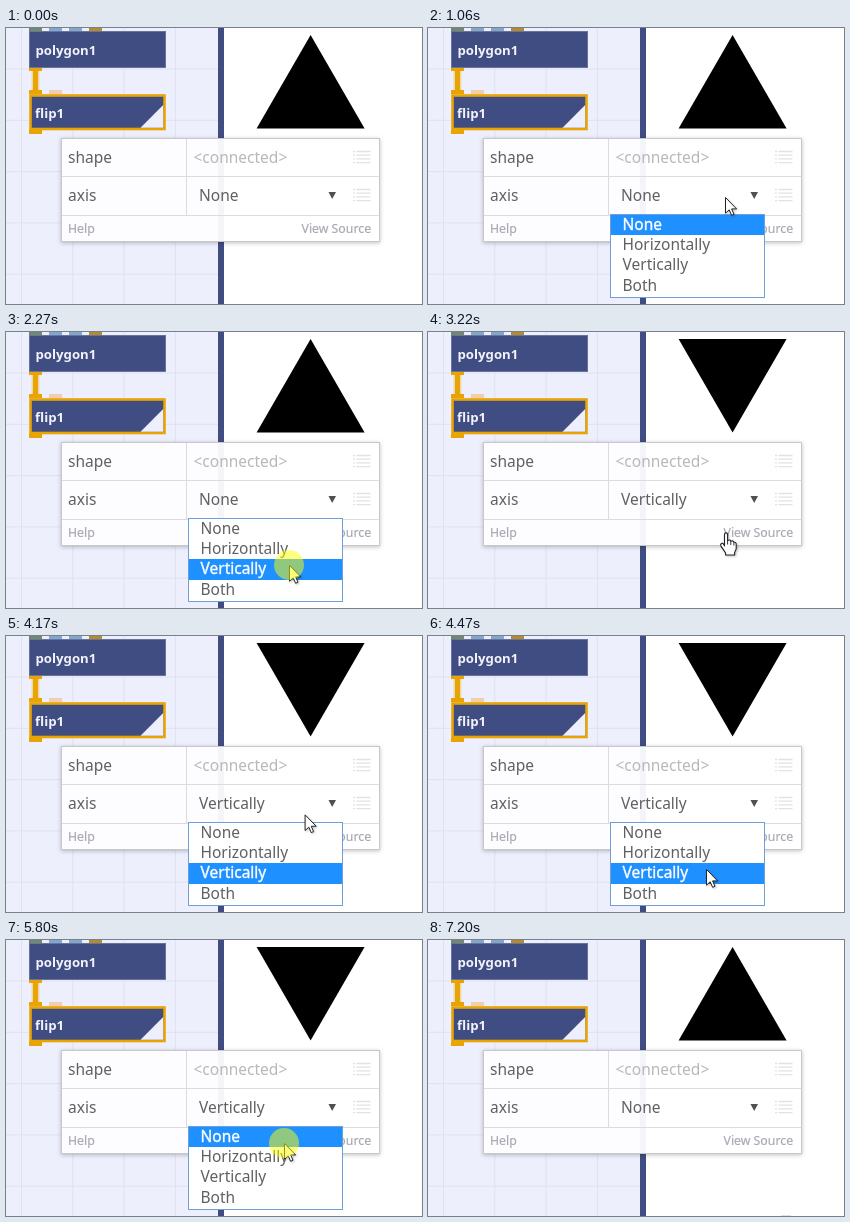
An HTML page for the animation above (7280 ms loop, 416x276 px).

```html
<!DOCTYPE html>
<html lang="en">
<head>
<meta charset="utf-8">
<title>Flip node</title>
<style>
html, body { margin: 0; width: 100%; height: 100%; overflow: hidden; background: #fff; }
svg { display: block; width: 416px; height: 276px; }
text { font-family: "Noto Sans", "Open Sans", sans-serif; font-size: 15.5px; fill: #606060; }
.node { font-size: 13.2px; font-weight: 600; fill: #f2f3fa; }
.foot { font-size: 12.3px; fill: #a9a9b4; stroke: #a9a9b4; stroke-width: .2px; }
.picked { fill: #fff; stroke: #fff; stroke-width: .35px; }
.panel { filter: drop-shadow(0 1px 2px rgba(0, 0, 0, .25)); }
.cursor { filter: drop-shadow(1px 1px 1px rgba(0, 0, 0, .25)); }
</style>
</head>
<body>
<svg viewBox="0 0 416 276">
  <defs>
    <pattern id="grid" x="15" y="40.5" width="51.3" height="51.3" patternUnits="userSpaceOnUse">
      <path d="M.5 0V52M0 .5H52" stroke="#dfe1ee"/>
    </pattern>
  </defs>
  <rect width="416" height="276" fill="#fff"/>
  <rect width="212" height="276" fill="#eeeffc"/>
  <rect width="212" height="276" fill="url(#grid)"/>
  <rect x="212" width="6" height="276" fill="#404d82"/>

  <path d="M23 0h13v3h-13z" fill="#71896d"/>
  <path d="M43 0h13v3h-13zM63 0h13v3h-13z" fill="#82a6cc"/>
  <path d="M83 0h13v3h-13z" fill="#b48a32"/>
  <rect x="23.5" y="3.5" width="136" height="36" fill="#404d82" stroke="#69739b"/>
  <text class="node" x="29.5" y="27">polygon1</text>

  <path d="M29.5 43V62" stroke="#e8a400" stroke-opacity=".3" stroke-width="8"/>
  <path d="M29.5 42V63" stroke="#e8a400" stroke-width="5"/>
  <path d="M23 40h13v3h-13zM23 62h13v4h-13zM23 102h13v4h-13z" fill="#e8a400"/>
  <rect x="43" y="62" width="13" height="4" fill="#f1cfac"/>
  <rect x="24.5" y="67.5" width="134" height="33.5" fill="#404d82" stroke="#e8a400" stroke-width="2.6"/>
  <path d="M134.5 99.7L157.2 77V99.7Z" fill="#eeeffc"/>
  <text class="node" x="29" y="90">flip1</text>

  <path id="shape"/>

  <rect class="panel" x="55.5" y="110.5" width="318" height="103" fill="#fff" stroke="#c8c8cc"/>
  <rect x="56" y="111" width="156" height="102" fill="#fdfdff"/>
  <rect x="212" y="111" width="6" height="102" fill="#f4f5f9"/>
  <path d="M56 148.5H373M56 187.5H373M180.5 111V187" stroke="#dcdcde"/>
  <text x="62" y="135">shape</text>
  <text x="62" y="173">axis</text>
  <text x="187.5" y="135" style="fill:#b8b8b8">&lt;connected&gt;</text>
  <text id="value" x="193" y="173"></text>
  <path d="M322.5 164H330L326.2 171Z" fill="#505050"/>
  <g stroke="#e2e2e2" stroke-width="1.3">
    <path id="list" d="M347 123.5h2m1.5 0h14M347 127.2h2m1.5 0h14M347 130.9h2m1.5 0h14M347 134.6h2m1.5 0h14"/>
    <use href="#list" y="38"/>
  </g>
  <text class="foot" x="62" y="205">Help</text>
  <text class="foot" x="295.5" y="205">View Source</text>

  <g id="menu">
    <rect x="182.5" y="186.5" width="154" height="83" fill="#fff" stroke="#6f9fd8"/>
    <rect id="hover" x="183" width="153" fill="#1e90ff"/>
  </g>

  <g id="arrow" class="cursor">
    <path d="M.5.5V16.2L4.2 12.8L6.6 18.3L9 17.2L6.6 11.9H11.6Z" fill="#fff" stroke="#222"/>
  </g>
  <g id="hand" class="cursor">
    <path d="M-1.5 12V1.2Q-1.5-.6 0-.6T1.6 1.2V7Q4.2 5.6 4.8 7.8Q7.2 6.7 7.9 8.8Q10.2 8.4 10.2 11V15.5L8.6 19V21.5H-.4V19.4L-5 12.6Q-6 10.8-4.6 10T-2.4 11Z" fill="#fff" stroke="#222" stroke-width="1.1"/>
    <path d="M1.6 7V11M4.8 8V11.5M7.9 9V12" stroke="#222" stroke-width=".9"/>
  </g>
  <circle id="click" r="15" fill="#ff0" fill-opacity=".5"/>
  <rect id="trace" x="353" y="275" width="10" height="1" fill="#e2e2e2"/>
</svg>
<script>
const LOOP = 7280;
const STEP = 76; // pointer refresh interval, ms
const OPTIONS = ["None", "Horizontally", "Vertically", "Both"];
const CLICKS = [[990, 1060], [2270, 2340], [3680, 3750], [5800, 5960]];
const ENTRY = { x: 353, y: 275 };
const MOVES = [
  { from: 450, to: 750, x: 297, y: 169 },
  { from: 1400, to: 1860, x: 283, y: 233 },
  { from: 3220, to: 3220, x: 298, y: 201.5 },
  { from: 3280, to: 3440, x: 301, y: 172 },
  { from: 4170, to: 4470, x: 278, y: 233 },
  { from: 4550, to: 4630, x: 277, y: 243 },
  { from: 4860, to: 5170, x: 278, y: 203 },
  { from: 6500, to: 6880, ...ENTRY }
];

const $ = id => document.getElementById(id);
const within = (t, a, b) => t >= a && t < b;
const show = (id, on) => $(id).setAttribute("visibility", on ? "visible" : "hidden");
const smooth = u => u * u * (3 - 2 * u);
const rowTop = i => Math.round(187 + i * 20.2);

const labels = OPTIONS.map((name, i) => {
  const el = document.createElementNS("http://www.w3.org/2000/svg", "text");
  el.setAttribute("x", 194.5);
  el.setAttribute("y", rowTop(i) + 15);
  el.textContent = name;
  $("menu").append(el);
  return el;
});

function pointerAt(t) {
  let { x, y } = ENTRY;
  for (const move of MOVES) {
    if (t < move.from) break;
    const steps = Math.round((move.to - move.from) / STEP) + 1;
    const done = Math.min(steps, 1 + Math.floor((t - move.from + 4) / STEP));
    const u = smooth(done / steps);
    x += (move.x - x) * u;
    y += (move.y - y) * u;
  }
  return { x, y };
}

function draw(t) {
  const flipped = within(t, 2340, 5960);
  const selected = flipped ? 2 : 0;
  $("shape").setAttribute("d", flipped ? "M250.6 7H358.6L304.6 100.4Z" : "M304.6 7L358.6 100.4H250.6Z");
  $("value").textContent = OPTIONS[selected];

  const { x, y } = pointerAt(t);
  const overLink = within(t, 3220, 3280);
  for (const id of ["arrow", "hand", "click"]) $(id).setAttribute("transform", `translate(${x} ${y})`);
  show("arrow", within(t, 450, 7200) && !overLink);
  show("hand", overLink);
  show("click", CLICKS.some(([a, b]) => within(t, a, b)));
  show("trace", t >= 7200);

  show("menu", within(t, 1060, 2340) || within(t, 3750, 5960));
  const row = y < rowTop(0) ? selected : Math.min(3, Math.floor((y - 187) / 20.2));
  $("hover").setAttribute("y", rowTop(row));
  $("hover").setAttribute("height", rowTop(row + 1) - rowTop(row));
  labels.forEach((el, i) => el.classList.toggle("picked", i === row));
}

const start = performance.now();
function tick() {
  draw((performance.now() - start) % LOOP);
  requestAnimationFrame(tick);
}
tick();
</script>
</body>
</html>
```
